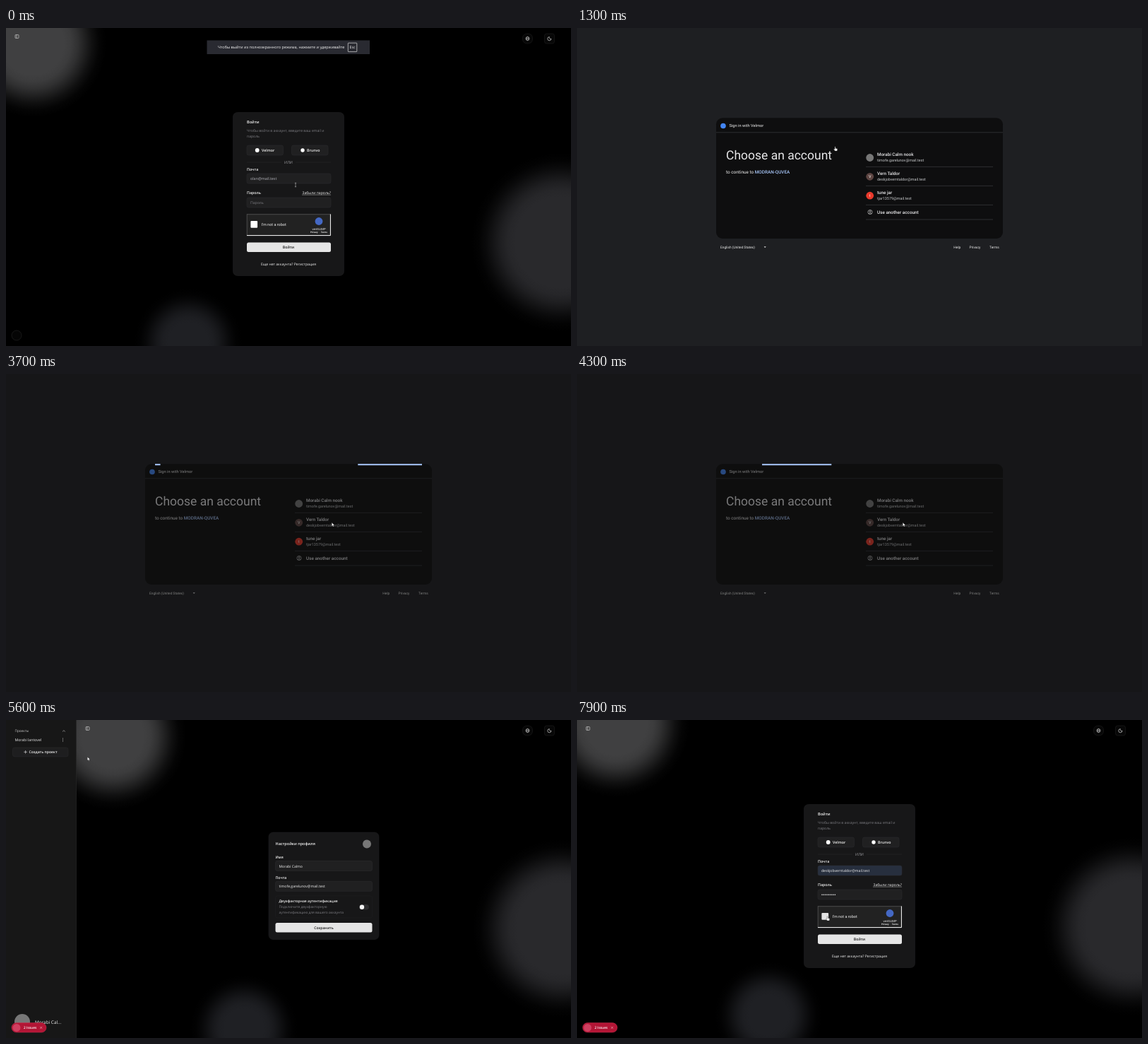
These frames come from a looping animation (800 by 450 pixels, 8 s). An HTML page:

```html
<!DOCTYPE html>
<html lang="ru">
<head>
<meta charset="utf-8">
<title>Вход</title>
<style>
  html, body { margin: 0; width: 100%; height: 100%; overflow: hidden; background: #000; }
  svg { display: block; width: 100%; height: 100%; }
  text { font-family: "Open Sans", "Noto Sans", sans-serif; text-rendering: geometricPrecision; white-space: pre; }
  .r text, text.r { font-family: Roboto, "Noto Sans", sans-serif; }
</style>
</head>
<body>
<svg id="stage" viewBox="0 0 800 450"></svg>
<script>
const LOOP = 8000, STEP = 100;
const BOLD = 'font-weight="600"', MEDIUM = 'font-weight="500"';
const MID = 'text-anchor="middle"', END = 'text-anchor="end"';
const WHITE = '#f2f2f2', MUTED = '#7d7d82', INK = '#1a1a1a';

const text = (x, y, str, size = 5.1, fill = WHITE, attrs = '') =>
  `<text x="${x}" y="${y}" font-size="${size}" fill="${fill}" ${attrs}>${str}</text>`;
const box = (x, y, w, h, fill, rx = 0, attrs = '') =>
  `<rect x="${x}" y="${y}" width="${w}" height="${h}" rx="${rx}" fill="${fill}" ${attrs}/>`;
const dot = (x, y, r, fill, attrs = '') =>
  `<circle cx="${x}" cy="${y}" r="${r}" fill="${fill}" ${attrs}/>`;
const line = (d, stroke = WHITE, width = .6, attrs = '') =>
  `<path d="${d}" fill="none" stroke="${stroke}" stroke-width="${width}" ${attrs}/>`;
const group = (id, ...parts) => `<g id="${id}">${parts.join('')}</g>`;
const stroke = (color, width = .5) => `stroke="${color}" stroke-width="${width}"`;
const field = (x, y, w, attrs = '') => box(x, y, w, 14, '#202021', 2.5, stroke('#2e2e30') + attrs);
const panel = (x, y, w, h) => box(x, y, w, h, '#171718', 6, stroke('#222224'));

// Soft round glow: flat core, smooth falloff
const glow = (id, color, radius, core) => {
  const stops = [1, .93, .75, .5, .25, .07, 0].map((a, i) =>
    `<stop offset="${(core + (radius - core) * i / 6) / radius}" stop-color="${color}" stop-opacity="${a}"/>`);
  return `<radialGradient id="${id}Fill">${stops.join('')}</radialGradient>` +
    dot(0, 0, radius, `url(#${id}Fill)`, `id="${id}"`);
};

const toolbar = [
  box(731.5, 8, 14, 14, '#070707', 6, stroke('#242424')),
  dot(738.5, 15, 2.6, 'none', stroke(WHITE)),
  `<ellipse cx="738.5" cy="15" rx="1.1" ry="2.6" fill="none" ${stroke(WHITE, .4)}/>`,
  line('M736 15h5', WHITE, .5),
  box(762.5, 8, 14, 14, '#070707', 3, stroke('#242424')),
  line('M769.4 12.6a1.9 1.9 0 0 0 2.6 2.6a2.6 2.6 0 1 1 -2.6 -2.6z'),
].join('');

const toggle = group('toggle',
  box(13, 9.6, 5, 4.8, 'none', .8, stroke('#ddd', .6)), line('M14.9 9.6v4.8', '#ddd'));

const login = group('login',
  panel(321.5, 119.5, 157, 231),
  text(341, 134.6, 'Войти', 5.6, WHITE, BOLD),
  text(341, 147, 'Чтобы войти в аккаунт, введите ваш email и', 5.1, MUTED),
  text(341, 154.9, 'пароль', 5.1, MUTED),
  field(341, 166, 51.5), dot(355.7, 173, 2.9, '#fff'), text(362, 174.9, 'Velmor', 5.3, WHITE, BOLD),
  field(404.5, 166, 51.5), dot(420, 173, 2.7, '#fff'), text(426, 174.9, 'Brunvo', 5.3, WHITE, BOLD),
  line('M341 190h49M410 190h50', '#29292b'),
  text(400, 192, 'ИЛИ', 5.3, '#a0a0a4', MID),
  text(341, 202, 'Почта', 5.3, WHITE, BOLD),
  field(341, 206, 119, ' id="mailField"'),
  group('empty', text(346, 214.9, 'olan@mail.test', 5.4, MUTED), text(346, 249, 'Пароль', 5.1, MUTED)),
  text(341, 235, 'Пароль', 5.3, WHITE, BOLD),
  text(460, 235, 'Забыли пароль?', 5.1, WHITE, END),
  line('M419 236.1h41', WHITE, .4),
  field(341, 240, 119),
  '<use href="#empty"/>',
  group('filled', text(346, 214.9, 'deskjobverntaldor@mail.test'),
    ...Array.from({length: 9}, (_, i) => dot(347 + i * 2.3, 247.2, .8, WHITE))),
  box(341, 263.5, 119, 30.5, '#222'),
  line('M341 263.7h119M341.2 263.5v30', '#777', .5),
  line('M459.4 263.5v30.1H341', '#fff', 1),
  box(346.4, 273, 9.7, 9.7, '#fff', 1, 'id="check"'),
  `<g class="r">`, text(361.5, 280, "I'm not a robot", 5.5),
  text(443, 285.7, 'veriGLIMP', 4.2, WHITE, MID),
  text(443, 290.2, 'Privacy  ·  Terms', 3.2, WHITE, MID + BOLD), '</g>',
  dot(443, 273.5, 5.4, '#4468c4'),
  box(341, 303.5, 119, 13.5, '#e5e5e5', 2.5),
  text(400, 312.3, 'Войти', 5.2, INK, MID + ' ' + BOLD),
  text(400, 336, 'Еще нет аккаунта? Регистрация', 5.1, WHITE, MID));

const profile = group('profile',
  panel(322, 159, 156, 151.5),
  text(331.5, 177.4, 'Настройки профиля', 5.5, WHITE, BOLD),
  dot(461, 175.5, 6, '#777'),
  text(331.5, 195.8, 'Имя', 5.2, WHITE, BOLD),
  field(331.5, 199.5, 137), text(336.5, 208.5, 'Morabi Calmo'),
  text(331.5, 224.8, 'Почта', 5.2, WHITE, BOLD),
  field(331.5, 228.3, 137), text(336.5, 237.3, 'timofe.garelunov@mail.test'),
  box(331.5, 249, 137, 31, 'none', 2.5, stroke('#202022')),
  text(336.5, 258.4, 'Двухфакторная аутентификация', 5, WHITE, BOLD),
  text(336.5, 266.2, 'Подключите двухфакторную', 4.9, MUTED),
  text(336.5, 273.8, 'аутентификацию для вашего аккаунта', 4.9, MUTED),
  box(450, 261, 14, 7.6, '#2c2c2e', 3.8), dot(454, 264.8, 3.2, '#f5f5f5'),
  box(331.5, 287, 137, 13.5, '#e5e5e5', 2.5),
  text(400, 295.7, 'Сохранить', 5.1, INK, MID + ' ' + BOLD));

const sidebar = group('sidebar',
  box(0, 0, 99.5, 450, '#171717'), line('M99.5 0v450', '#2a2a2a'),
  text(12.5, 17.4, 'Проекты', 4.7, '#c8c8c8'),
  line('M80 16.5l1.9-1.8l1.9 1.8', '#ccc'),
  text(12.5, 30.4, 'Morabi lantovel', 5.2),
  ...[26, 28, 30].map(y => dot(80.5, y, .5, '#ddd')),
  box(9.5, 39, 78.5, 12.8, '#1e1e1f', 2.5, stroke('#2c2c2e')),
  line('M25.3 45.3h4.6M27.6 43v4.6'),
  text(32.5, 47.4, 'Создать проект', 5.1, WHITE, BOLD),
  dot(23, 427, 11, '#777'),
  text(41, 429.5, 'Morabi Cal...', 6.4));

const badge = group('badge',
  box(8, 428.6, 49, 13.4, '#b31535', 6.7, stroke('#cc3050')),
  dot(15, 435.4, 5.5, '#cf3f60'),
  text(25, 437.2, '2 Issues', 4.8, '#fff', BOLD),
  line('M48.2 433.9l3 3m0-3l-3 3', '#f3b5c2'));

const banner = group('banner',
  box(284.5, 17.5, 230.5, 19.5, '#292a31'),
  text(300, 29.4, 'Чтобы выйти из полноэкранного режима, нажмите и удерживайте', 5.5),
  box(484.3, 21.2, 12.5, 12.4, 'none', .6, stroke('#ddd', .7)),
  text(490.5, 29.3, 'Esc', 5.2, WHITE, MID));

const account = (y, name, mail, color, letter) =>
  dot(414.7, y + .5, 5.4, color) + text(414.7, y + 2.5, letter, 5.5, '#fff', MID) +
  text(425, y - 2, name, 6.3, '#e8e8ea', MEDIUM) + text(425, y + 6.4, mail, 5.4, '#c8cacc');

const chooser = group('chooser',
  '<g class="r">',
  box(0, 0, 800, 450, '#1e1f22'),
  box(197, 127.3, 406, 170.7, '#0e0e0f', 9),
  line('M197 147.8h406', '#3c3d40', .7),
  dot(207, 138.5, 3.8, '#4285f4'),
  text(215.5, 140.3, 'Sign in with Velmor', 5.7),
  text(211, 186.3, 'Choose an account', 17.5, '#e6e6e8'),
  text(211, 206, 'to continue to <tspan fill="#a8c7fa" font-weight="500">MODRAN-QUVEA</tspan>', 6.4),
  line('M409 196.4h180M409 223.4h180M409 250.4h180M409 271h180', '#3c3d40', .7),
  box(403, 196, 192.5, 27.8, '#1f2023', 6, 'id="hover"'),
  account(183, 'Morabi Calm nook', 'timofe.garelunov@mail.test', '#777', ''),
  account(209.8, 'Vern Taldor', 'deskjobverntaldor@mail.test', '#5d4542', 'V'),
  account(236.7, 'tune jar', 'tjar13579@mail.test', '#e8392b', 't'),
  dot(415, 260.5, 3.1, 'none', stroke('#ddd', .6)), dot(415, 259.6, 1, 'none', stroke('#ddd', .6)),
  line('M412.9 262.6q2.1-1.7 4.2 0', '#ddd'),
  text(425, 262.5, 'Use another account', 6.35, '#e8e8ea', MEDIUM),
  text(203, 311.8, 'English (United States)', 4.85),
  '<path d="M264.6 309.2h3.2l-1.6 1.7z" fill="#ddd"/>',
  text(533.3, 311.8, 'Help', 4.9), text(555.6, 311.8, 'Privacy', 4.9), text(584, 311.8, 'Terms', 4.9),
  '</g>',
  box(0, 0, 800, 450, '#0e0e0f', 0, 'id="dim"'),
  group('progress', box(211, 127.2, 0, 2, '#a8c7fa'), box(211, 127.2, 0, 2, '#a8c7fa')));

const cursors = group('cursor',
  `<path id="arrow" d="M-1.7 -2.7v5l1.2-1l.8 1.8l.9-.4l-.8-1.7h1.6z" fill="#fff" ${stroke('#111', .3)}/>`,
  `<path id="hand" d="M-1 -3q.6-.5 1 0v2.2l2.2.5q.6.2.5.9l-.4 2.4h-2.9l-1.9-2.3q.1-.8.9-.5l.6.5z" fill="#fff" ${stroke('#111', .3)}/>`,
  line('M-1.1 -2.7h2.2M0 -2.7v5.4M-1.1 2.7h2.2', '#ddd', .5, 'id="beam"'));

const stage = document.getElementById('stage');
stage.innerHTML = group('app',
    box(0, 0, 800, 450, '#000'),
    glow('topGlow', '#404041', 104, 44),
    glow('sideGlow', '#29292c', 126, 64),
    glow('lowGlow', '#1f2024', 76, 28),
    toolbar, sidebar, toggle, profile, login,
    dot(15, 435, 7, '#050505', 'id="mark" ' + stroke('#2c2c2c')), badge) +
  chooser + banner + cursors;

const el = id => document.getElementById(id);
const show = (id, on) => { el(id).style.display = on ? '' : 'none'; };
const move = (id, x, y = 0) => el(id).setAttribute('transform', `translate(${x} ${y})`);
const smooth = u => u * u * (3 - 2 * u);
const ramp = (t, from, to) => Math.min(1, Math.max(0, (t - from) / (to - from)));

// rows: [time, ...values]
function track(rows, t, ease = u => u) {
  let i = 0;
  while (i < rows.length - 2 && rows[i + 1][0] <= t) i++;
  const [a, b] = [rows[i], rows[i + 1]], u = ease(ramp(t, a[0], b[0]));
  return a.slice(1).map((v, k) => v + (b[k + 1] - v) * u);
}

const POINTER = [
  [0, 410, 222], [300, 366, 171], [1300, 366, 171], [1400, 461, 213], [2400, 463, 214],
  [2600, 463, 213], [4600, 463, 213], [5200, 16, 13], [5300, 16, 13], [5500, 117, 55],
  [5600, 117, 55], [6100, 60, 430], [6400, 60, 430], [6900, 400, 213], [7000, 400, 213],
  [7700, 355, 281], [8000, 355, 281]];
// top, side and low glow centres
const DRIFT = [
  [0, 38, 22, 785, 303, 258, 445], [1200, 36, 25, 785, 304, 260, 445],
  [4400, 28, 38, 768, 310, 257, 447], [5600, 51, 23, 787, 295, 262, 437],
  [7900, 55, 5, 785, 292, 271, 418]];
// time from which each pointer shape is used
const SHAPES = [[0, 'beam'], [200, 'arrow'], [300, 'hand'], [2600, 'arrow'], [6900, 'beam'],
  [7200, 'arrow'], [7700, 'hand']];

function progressBar(t) {
  const [main, wrapped] = el('progress').children, width = 378;
  const tail = (.76 + (t - 3700 + LOOP * 2) / 1600) % 1, head = tail + .26;
  main.setAttribute('x', 211 + tail * width);
  main.setAttribute('width', (Math.min(1, head) - tail) * width);
  wrapped.setAttribute('width', Math.max(0, head - 1) * width);
}

function draw(t) {
  const choosing = t >= 1300 && t < 4400, signedIn = t >= 4400 && t < 6300;
  const open = signedIn ? smooth(ramp(t, 5200, 5500)) : 0;
  const autofilled = t >= 6800;

  show('app', !choosing);
  show('chooser', choosing);
  show('login', !choosing && !signedIn);
  show('profile', signedIn && t >= 4700);
  show('sidebar', open > 0);
  show('mark', t < 1300);
  show('badge', t >= 4700);

  const [tx, ty, sx, sy, lx, ly] = track(DRIFT, t);
  move('topGlow', tx + 100 * open, ty);
  move('sideGlow', sx, sy);
  move('lowGlow', lx + 75 * open, ly);
  move('sidebar', 100 * (open - 1));
  move('toggle', 100 * open);
  move('profile', 50 * open);

  show('empty', !autofilled);
  show('filled', autofilled);
  el('mailField').setAttribute('fill', autofilled ? '#272f3e' : '#202021');
  el('check').setAttribute('fill', t >= 7700 ? '#e4e4e4' : '#fff');

  el('banner').style.opacity = choosing || t > 1300 ? 0 : track([[500, 1], [1200, .1], [1300, 0]], t)[0];
  show('hover', t >= 1400 && t < 2700);
  el('dim').style.opacity = .5 * ramp(t, 2500, 2900);
  show('progress', t >= 2700);
  progressBar(t);

  move('cursor', ...track(POINTER, t, smooth));
  const shape = SHAPES.filter(([from]) => from <= t).pop()[1];
  ['arrow', 'hand', 'beam'].forEach(id => show(id, id === shape));
}

const start = performance.now();
function frame() {
  const t = (performance.now() - start) % LOOP;
  draw(Math.floor(t / STEP) * STEP);
  requestAnimationFrame(frame);
}
frame();
</script>
</body>
</html>
```
